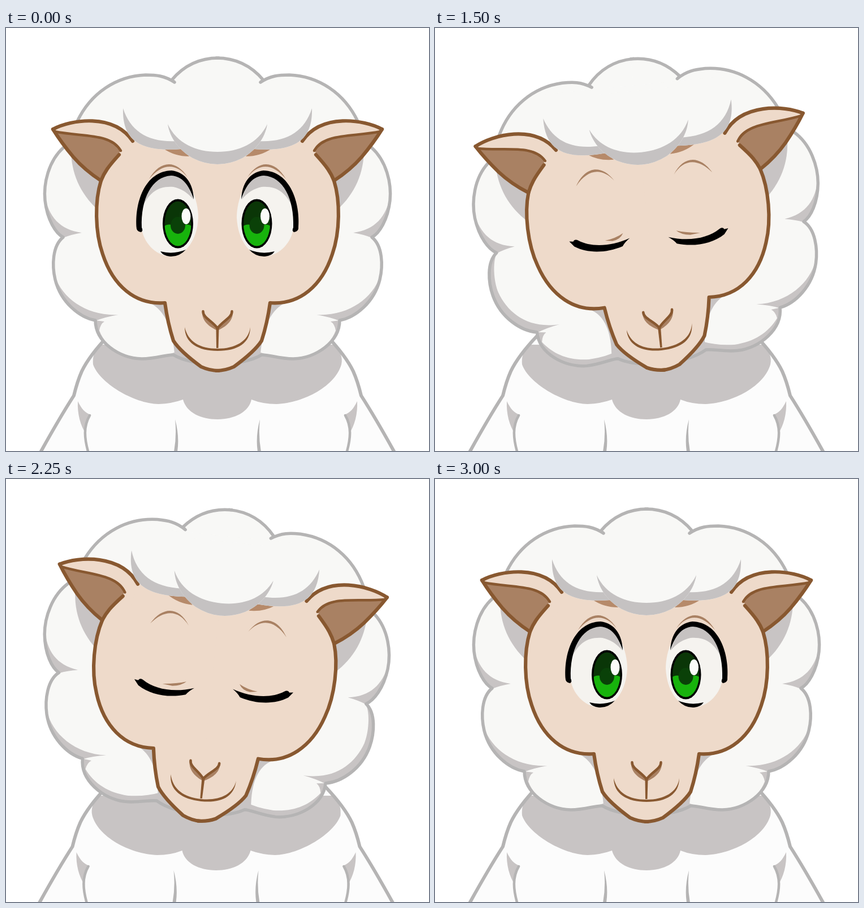
These frames come from a looping animation (748 by 748 pixels, 3.25 s). An HTML page with a canvas:

```html
<!DOCTYPE html>
<html lang="en">
<head>
<meta charset="utf-8">
<title>Curious sheep</title>
<style>
  html, body { margin: 0; width: 100%; height: 100%; overflow: hidden; background: #fff; }
  canvas { display: block; width: 100%; height: 100%; }
</style>
</head>
<body>
<canvas id="stage" width="748" height="748"></canvas>
<script>
const SIZE = 748, LOOP = 3250;
const ctx = document.getElementById('stage').getContext('2d');

const LINE = '#b5b4b4', WOOL = '#f8f8f6', SHADE = '#c8c4c4', BODY = '#fcfcfc';
const SKIN = '#eedaca', BROWN = '#885830', TAN = '#a98163';

// Poses: tilt in degrees, head shift, body shift, eyes closed
const pose = (tilt, head, body, closed) => ({ tilt, head, body, closed });
const front = pose(0, 0, 0, false);
const leftSmall = pose(-3.23, 2, 0, false);
const leftBlink = pose(-5.79, 5.5, 0, true);
const leftFull = pose(-12.94, 0, 0, false);
const rightSmall = pose(3.23, -4.5, -2.5, false);
const rightBlink = pose(5.79, -8, -2.5, true);
const rightFull = pose(12.94, -3, -2.5, false);

// [end time, pose]
const timeline = [
  [370, front], [500, leftSmall], [620, leftBlink], [1500, leftFull],
  [1620, leftBlink], [1750, leftSmall], [2120, front], [2250, rightSmall],
  [2370, rightBlink], [2750, rightFull], [2870, rightBlink], [3000, rightSmall],
  [LOOP, front]
];

function fill(d, color) {
  ctx.fillStyle = color;
  ctx.fill(new Path2D(d));
}

function stroke(d, color, width) {
  ctx.strokeStyle = color;
  ctx.lineWidth = width;
  ctx.stroke(new Path2D(d));
}

function flipped(draw) {
  ctx.save();
  ctx.translate(SIZE, 0);
  ctx.scale(-1, 1);
  draw();
  ctx.restore();
}

// Draws the left half (side -1) and its mirror image (side 1)
function both(draw) {
  draw(-1);
  flipped(() => draw(1));
}

const WOOL_EDGE = 'M376 53 C342 53 314 67 293 92 L298 96 C280 84 265 83 247 83 ' +
  'C195 85 150 115 126 165 C114 190 110 205 102 211 C75 235 66 275 69 305 ' +
  'C73 340 88 363 101 370 C82 385 81 420 87 445 C97 485 130 512 158 517 ' +
  'C158 555 200 584 240 585 C265 585 285 577 296 578 C315 589 345 594 376 594';

const FACE_EDGE = 'M200 224 C180 246 174 255 168 270 C157 305 157 360 171 400 ' +
  'C189 455 228 490 281 486 C284 508 287 525 296 553 C306 569 330 588 345 599 ' +
  'C356 604 366 606 376 606';

function drawBody(p) {
  const big = Math.abs(p.tilt) > 10;
  const shoulder = big ? 'M163 543 Q148 578 133 607' : 'M180 545 Q147 580 134 607';
  const edge = shoulder + ' Q126 625 120 650 C102 678 86 705 60 752';
  both(() => fill(edge + ' L376 752 L376 545 Z', BODY));

  const neck = 'M165 560 C155 573 153 583 154 595 C165 627 225 664 270 665 ' +
    (big
      ? 'Q293 664 309 659 C326 681 350 699 388 702 C420 700 434 677 448 661 Q468 666 485 666 '
      : 'Q294 664 313 657 C319 680 345 692 374 692 C405 692 430 678 434 657 Q454 665 478 665 ') +
    'C528 663 583 632 593 595 C596 583 591 571 582 560 Z';
  if (p.tilt > 0) flipped(() => fill(neck, SHADE));
  else fill(neck, SHADE);

  both(() => {
    stroke(edge, LINE, 6);
    fill('M127 660 C134 674 139 680 150 684 C142 697 141 706 142 719 C131 702 126 682 127 660 Z', SHADE);
    stroke('M148 685 C137 704 138 725 146 752', LINE, 4.5);
    fill('M299 692 Q307 722 303 749 L297 749 Q302 722 299 692 Z', LINE);
  });
}

function drawWool(p) {
  both(() => fill(WOOL_EDGE + ' Z', WOOL));
  both(side => {
    // Shading deepens with the tilt, mostly on the lowered side
    const cast = Math.max(0, p.tilt * side);
    const band = Math.min(10, 1.8 * cast);
    const lift = Math.min(10, 1.8 * Math.abs(p.tilt));
    const foot = 298 - Math.min(20, 2.3 * cast);
    fill('M69 297 C75 333 95 357 134 362 Q116 365 101 371 C82 360 70 330 69 297 Z', SHADE);
    fill(`M101 371 C${82 + band} 387 ${81 + band} 420 ${87 + band} 440 ` +
      `C${100 + band} 478 143 510 199 507 Q175 511 158 518 ` +
      'C130 512 97 485 87 445 C81 420 82 385 101 370 Z', SHADE);
    fill('M157 517 L174 519 Q167 523 165 535 ' +
      `C${178 + lift / 2} ${569 - lift} 210 ${583 - lift} 245 ${584 - lift} ` +
      `Q275 ${583 - lift} 300 ${573 - lift} ` +
      'L300 580 C285 577 265 585 240 585 C200 584 158 555 157 517 Z', SHADE);
    fill('M115 215 C115 255 130 292 162 321 L190 260 Z', SHADE);
    fill(`M256 487 Q292 506 ${foot} 576 L312 588 L345 590 L310 487 Z`, SHADE);
    stroke(WOOL_EDGE, LINE, 5.5);
  });
}

function drawFace() {
  both(() => fill(FACE_EDGE + ' L376 190 L225 180 Z', SKIN));
  both(() => {
    const top = 'M83 179 C115 162 190 150 224 200';
    const under = 'C148 257 132 243 119 228 Q98 203 83 179';
    fill(top + ' L216 240 L168 270 ' + under + ' Z', SKIN);
    fill('M90 184 C135 193 188 184 203 214 Q200 225 184 242 Q174 255 168 270 ' + under + ' Z', TAN);
    stroke('M86 183 C135 193 184 185 203 217', BROWN, 4.5);
    stroke(FACE_EDGE, BROWN, 6.2);
    stroke(top, BROWN, 6.2);
    stroke('M168 270 ' + under, BROWN, 6.2);
    fill('M278 213 Q298 227 324 227 L306 208 Z', '#b68a6a');
  });
}

function drawIris(x) {
  ctx.save();
  ctx.translate(x, 346);
  const oval = (cx, cy, rx, ry, color) => {
    ctx.beginPath();
    ctx.ellipse(cx, cy, rx, ry, 0, 0, 7);
    ctx.fillStyle = color;
    ctx.fill();
  };
  oval(0, 0, 27, 43.5, '#000');
  oval(0, 0, 23.5, 39.5, '#0a3607');
  ctx.clip();
  fill('M-30 8 Q-20 0 -12 2 L12 2 Q20 0 30 8 L30 50 L-30 50 Z', '#17b30c');
  oval(0, 3, 13, 15, '#0a4108');
  ctx.restore();
  ctx.save();
  ctx.translate(x, 346);
  oval(14.5, -13, 8, 14, '#fbfbf9');
  ctx.restore();
}

function drawOpenEyes() {
  both(() => {
    fill('M240 355 C237 295 262 258 293 257 C325 260 340 305 340 335 ' +
      'C338 375 318 403 290 404 C263 402 243 378 240 355 Z', '#f5f3ef');
    fill('M239 322 C252 290 270 279 296 281 Q316 285 331 303 C320 270 310 260 293 257 ' +
      'C262 257 243 287 239 322 Z', '#c6c2c1');
    fill('M231 355 C227 310 245 253 293 252 C318 255 331 276 332 303 ' +
      'C323 276 311 262 292 261 C258 263 238 302 240 353 Q243 358 239 361 Q232 360 231 355 Z', '#000');
    fill('M273 395 Q296 401 318 392 Q306 405 290 404 Q278 403 273 395 Z', '#000');
  });
  drawIris(304);
  drawIris(443.5);
}

function drawClosedEyes(p) {
  both(side => {
    const raised = p.tilt * side < 0;
    ctx.save();
    if (raised) ctx.translate(4, 5);
    fill('M231 363 L238 364 Q241 359 247 363 C268 377 302 380 338 368 ' +
      'Q329 374 324 381 C295 390 262 388 239 373 Z', '#000');
    fill(raised
      ? 'M281 366 Q304 364 323 358 Q315 366 299 368 Z'
      : 'M294 368 Q313 366 327 358 Q321 369 307 370 Z', TAN);
    ctx.restore();
  });
}

function drawFeatures(p) {
  both(() => fill('M253 267 C272 234 301 232 321 264 C301 238 276 239 253 267 Z', TAN));
  if (p.closed) drawClosedEyes(p);
  else drawOpenEyes();

  both(() => {
    fill('M347 502 C346 518 360 529 374 535 L374 528 Q353 517 350 503 Z', TAN);
    stroke('M348.5 501 C348 512 365 518 374 531', BROWN, 4.5);
  });
  fill('M371.5 531 L376.5 531 L375.5 566 L372 566 Z', BROWN);
  fill('M316 529 C316 557 340 571 374 571 C410 571 432 557 432 529 ' +
    'C429 554 405 567 374 567 C343 567 322 555 316 529 Z', BROWN);
}

function drawFringe() {
  const lobe = 'M207 142 C205 203 243 219 310 214 ';
  both(() => fill(lobe + 'L330 214 L376 200 L376 100 L215 100 Z', WOOL));
  both(() => fill(lobe + 'L303 200 C252 203 220 183 207 142 Z', '#c5c2c2'));
  const mid = 'M286 170 C290 195 306 216 330 230 Q352 241 374 241 Q396 241 418 230 C442 216 458 195 462 170 ';
  fill(mid + 'L440 110 L310 110 Z', WOOL);
  fill(mid + 'C446 204 412 219 374 219 C336 219 302 204 286 170 Z', '#c5c2c2');
}

function drawHead(p) {
  ctx.save();
  ctx.translate(374 + p.head, 361);
  ctx.rotate(p.tilt * Math.PI / 180);
  ctx.translate(-374, -361);
  drawWool(p);
  drawFace();
  drawFeatures(p);
  drawFringe();
  ctx.restore();
}

function render(t) {
  const p = timeline.find(([end]) => t < end)[1];
  ctx.fillStyle = '#fff';
  ctx.fillRect(0, 0, SIZE, SIZE);
  ctx.lineCap = ctx.lineJoin = 'round';
  ctx.save();
  ctx.translate(p.body, 0);
  drawBody(p);
  ctx.restore();
  drawHead(p);
}

const start = performance.now();
function tick() {
  render((performance.now() - start) % LOOP);
  requestAnimationFrame(tick);
}
tick();
</script>
</body>
</html>
```
